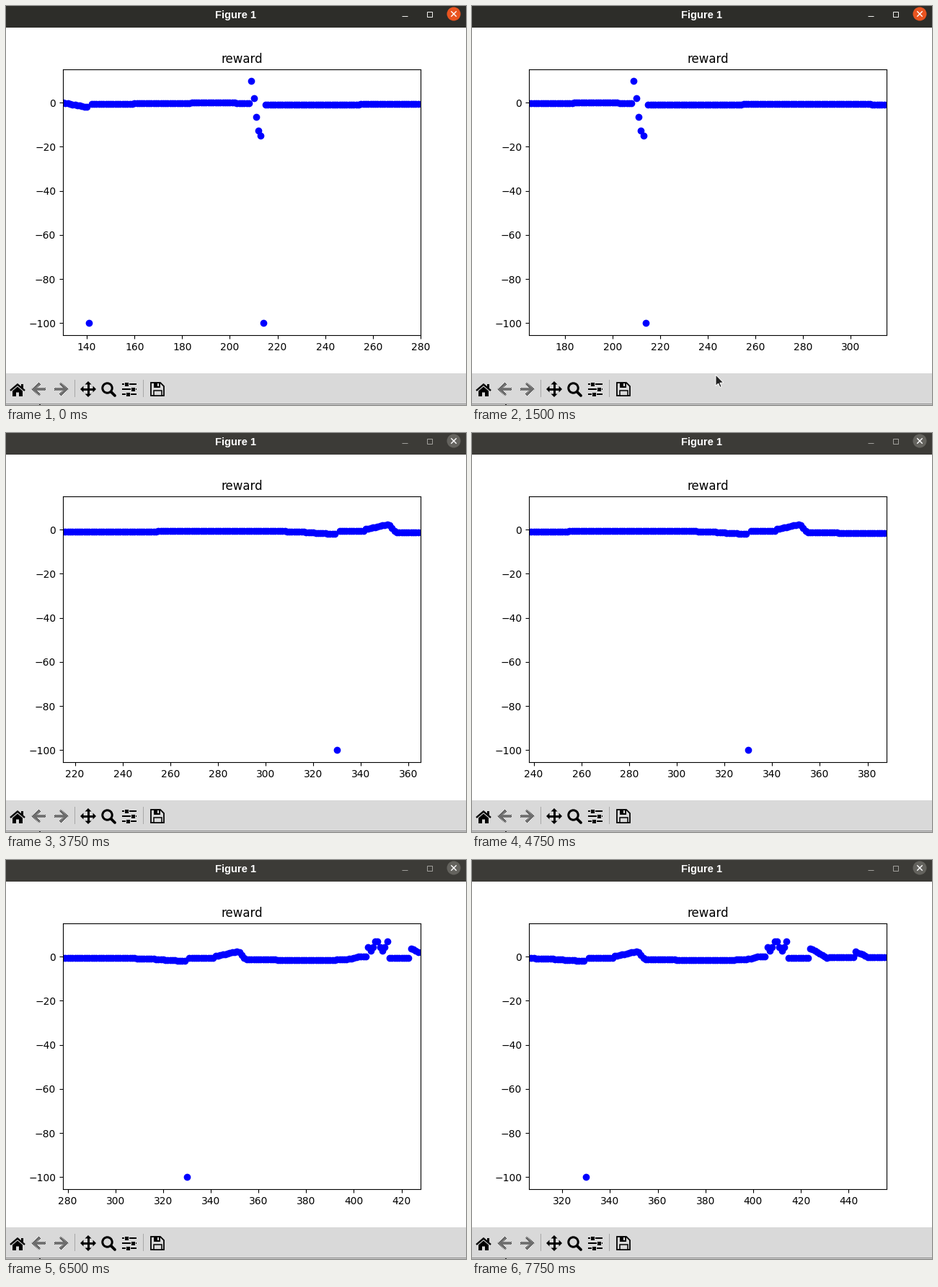
A matplotlib script that plays this animation: 638 by 554 pixels, repeating every 8 s.

```python
import numpy as np
import matplotlib.pyplot as plt
from matplotlib.animation import FuncAnimation
from matplotlib.patches import Circle, Polygon, Rectangle
from matplotlib.ticker import MultipleLocator

W, H, DPI = 638, 554, 100
PX = 72 / DPI  # points per pixel
FRAMES, INTERVAL = 32, 250
FIRST, SPAN = 130, 150
RATE = 91 / 16  # steps scrolled per frame
TOOLBAR = "#d9d9d9"

# Key points of the slow drift between the bursts
DRIFT = [(130, 0), (140, -1.9), (142, -0.68), (195, 0), (208, -0.25),
         (215, -1), (270, -0.65), (312, -0.76), (329, -1.9), (331, -0.6),
         (341, -0.6), (355, -1.2), (380, -1.5), (397, -1.3), (402, 0),
         (405, 0), (415, -0.6), (448, -0.3)]
CRASHES = (141, 214, 330)


def rewards(steps):
    values = np.round(np.interp(steps, *zip(*DRIFT)) / 0.3) * 0.3

    def burst(start, end, shape):
        inside = (steps >= start) & (steps <= end)
        values[inside] = shape((steps[inside] - start) / (end - start))

    def ramp(start, end, a, b):
        burst(start, end, lambda t: a + (b - a) * t)

    burst(209, 213, lambda t: 9.9 - 24.9 * np.sin(np.pi * t / 2) ** 1.2)
    ramp(342, 351, 0.3, 2.3)
    ramp(352, 354, 1.9, -0.5)
    burst(406, 414, lambda t: 5 - 2.2 * np.cos(2 * np.pi * (8 * t - 1) / 5))
    ramp(424, 430, 3.8, 0.2)
    ramp(443, 447, 2.3, 0.4)
    values[np.isin(steps, CRASHES)] = -100
    return values


fig = plt.figure(figsize=(W / DPI, H / DPI), dpi=DPI, facecolor="white")
stage = fig.add_axes([0, 0, 1, 1])
stage.axis("off")


def rect(x, y, w, h, color, **kw):
    return stage.add_patch(Rectangle((x, y), w, h, fc=color, lw=0, **kw))


def poly(points, color="black", **kw):
    kw.setdefault("lw", 0)
    return stage.add_patch(Polygon(points, fc=color, **kw))


def line(xs, ys, width, color="black", cap="butt"):
    return stage.plot(xs, ys, color=color, lw=width * PX,
                      solid_capstyle=cap, solid_joinstyle="miter")[0]


def draw_home(x, y):
    line([x - 10, x, x + 10], [y + 1, y - 7.5, y + 1], 2.4)
    rect(x + 4.5, y - 8, 3, 6, "black")
    poly([(x - 7, y + 1.5), (x, y - 4.5), (x + 7, y + 1.5), (x + 7, y + 9),
          (x + 2, y + 9), (x + 2, y + 3.5), (x - 2, y + 3.5), (x - 2, y + 9),
          (x - 7, y + 9)])


def draw_disabled_arrow(x, y, way):
    """Arrow with a one-pixel checker stipple; way is -1 for left."""
    line([x - way, x + 8 * way, x - way], [y - 8, y, y + 8], 3.6)
    line([x - 9 * way, x + 6 * way], [y, y], 3.6)
    n = 24
    stipple = np.ones((n, n, 4)) * (0.851, 0.851, 0.851, 1)
    stipple[..., 3] = np.indices((n, n)).sum(axis=0) % 2
    stage.imshow(stipple, extent=(x - 12, x + 12, y + 12, y - 12),
                 aspect="auto", interpolation="nearest", zorder=3)


def draw_move(x, y):
    line([x - 8, x + 8], [y, y], 3)
    line([x, x], [y - 8, y + 8], 3)
    for dx, dy in ((1, 0), (-1, 0), (0, 1), (0, -1)):
        bx, by = x + 6.5 * dx, y + 6.5 * dy
        poly([(x + 11 * dx, y + 11 * dy),
              (bx + 4.5 * dy, by + 4.5 * dx), (bx - 4.5 * dy, by - 4.5 * dx)])


def draw_zoom(x, y):
    stage.add_patch(Circle((x, y), 6.7, fill=False, ec="black", lw=3 * PX))
    line([x + 5, x + 10.5], [y + 5, y + 10.5], 3.8, cap="round")


def draw_sliders(x, y):
    for dy, knob in ((-7, 6), (0, 15), (7, 8)):
        rect(x, y + dy - 1, 20, 2, "black")
        rect(x + knob - 3.5, y + dy - 2, 7, 4, TOOLBAR)
        rect(x + knob - 2.5, y + dy - 2.5, 5, 5, "black")


def draw_save(x, y):
    poly([(x, y), (x + 13, y), (x + 18, y + 5), (x + 18, y + 18), (x, y + 18)],
         TOOLBAR, ec="black", lw=1.8 * PX)
    rect(x + 3.5, y, 9.5, 6.5, "black")
    rect(x + 8.5, y + 1.2, 2.5, 4, TOOLBAR)
    poly([(x + 3.5, y + 18), (x + 3.5, y + 11), (x + 14.5, y + 11),
          (x + 14.5, y + 18)], TOOLBAR, ec="black", lw=1.5 * PX)


# Window frame
bar = rect(0, 0, W, 30, "#2d2d29")
stage.text(318.5, 17, "Figure 1", color="white", ha="center", va="baseline",
           family="Liberation Sans", weight="bold", size=14.6 * PX)
shrink = line([549, 557], [13.5, 13.5], 1)
grow = stage.add_patch(Rectangle((583.5, 7.5), 7, 7, fill=False, lw=PX))
close = stage.add_patch(Circle((621, 11), 9.5, lw=0))
for sign in (1, -1):
    line([617.3, 624.7], [11 - 3.7 * sign, 11 + 3.7 * sign], 1.4, "white")

# Toolbar
rect(0, 510, W, 42, TOOLBAR)
rect(0, 552, W, 1, "#8c8c8c")
rect(0, 553, W, 1, "#d0d0d0")
rect(46, 553, 2, 1, "#333333")
for x in (95, 190):
    rect(x, 519, 1, 24, "#a8a8a8")
draw_home(16, 533)
draw_disabled_arrow(46, 532, -1)
draw_disabled_arrow(76, 532, 1)
draw_move(114, 532)
draw_zoom(140.5, 530.5)
draw_sliders(161, 532)
draw_save(201, 523)
stage.set_xlim(0, W)
stage.set_ylim(H, 0)

# Chart
ax = fig.add_axes([79 / W, 96.8 / H, 496 / W, 369.6 / H])
dots, = ax.plot([], [], "bo")
ax.set_title("reward")
ax.set_ylim(-105.5, 15.2)
ax.xaxis.set_major_locator(MultipleLocator(20))
ax.yaxis.set_major_locator(MultipleLocator(20))

POINTER = np.array([(0, 0), (0, 15.5), (3.6, 12.2), (6, 17.5), (8.2, 16.5),
                    (5.9, 11.3), (10.8, 11)])
pointer = poly(POINTER, "#222222", ec="white", lw=PX, zorder=5)


def draw(i):
    # The scroll runs slightly ahead in the middle of each 16-frame cycle.
    left = FIRST + round(RATE * i + 0.5 * abs(np.sin(np.pi * i / 16)))
    ax.set_xlim(left, left + SPAN)
    steps = np.arange(left, left + SPAN)
    dots.set_data(steps, rewards(steps))

    focused = i < 7
    bar.set_facecolor("#2d2d29" if focused else "#3c3b37")
    close.set_facecolor("#e95420" if focused else "#64635e")
    tint = "#f0f0ee" if focused else "#a09f9b"
    shrink.set_color(tint)
    grow.set_edgecolor(tint)

    # The pointer rises from the toolbar, then leaves the window.
    pointer.set_visible(5 <= i <= 6)
    pointer.set_xy(POINTER + (338, 512 + 20 * (6 - i)))
    return []


anim = FuncAnimation(fig, draw, frames=FRAMES, interval=INTERVAL,
                     init_func=lambda: draw(0), repeat=True, repeat_delay=0)
plt.show()
```
